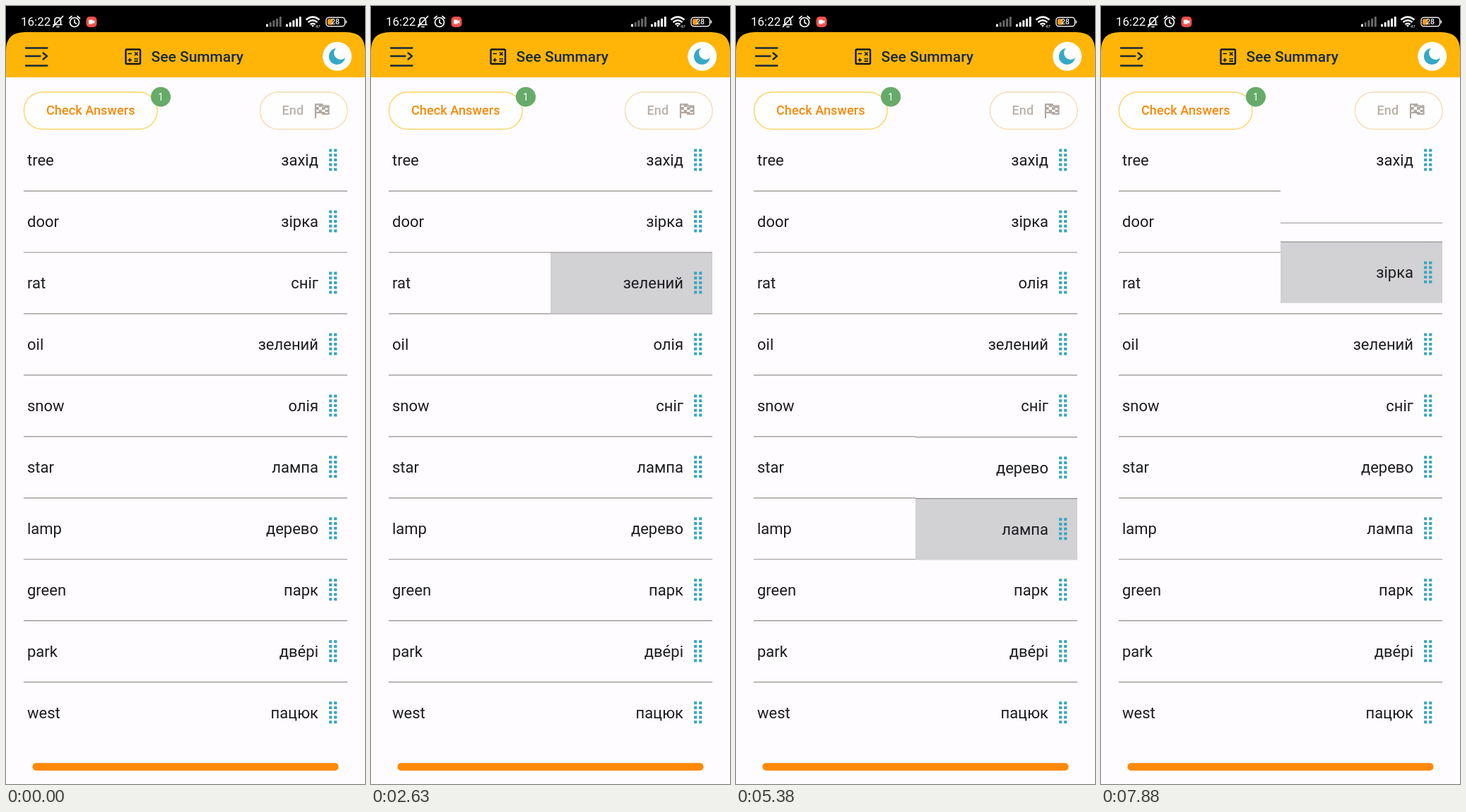
An HTML page for the animation above (8000 ms loop, 508 px wide and 1102 px high).

```html
<!DOCTYPE html>
<html lang="en">
<head>
<meta charset="utf-8">
<title>Match the words</title>
<style>
  html, body { margin: 0; width: 100%; height: 100%; overflow: hidden; background: #fefcfe; }
  svg { display: block; width: 508px; height: 1102px; font-family: Roboto, sans-serif; }
  .word { font-size: 22px; fill: #1c1b1f; }
  .right { text-anchor: end; }
  .button { font-size: 18px; font-weight: 500; letter-spacing: .1px; }
  .rule { stroke: #928f8c; stroke-width: 1.2; }
  .grip { stroke: #38a6bf; stroke-width: 4.2; stroke-dasharray: 4 2.75; }
  .cell rect { fill: none; }
  .cell.held rect { fill: #d2d1d4; }
  .line { fill: none; stroke: #fff; stroke-width: 1.7; stroke-linecap: round; stroke-linejoin: round; }
  .ink { fill: none; stroke: #17293c; stroke-width: 2.3; stroke-linecap: round; stroke-linejoin: round; }
</style>
</head>
<body>
<svg viewBox="0 0 508 1102">
  <rect width="508" height="101" fill="#000"/>
  <path d="M0 101V63Q0 37 27 37H481Q508 37 508 63V101Z" fill="#ffb508"/>

  <!-- status bar -->
  <text x="21" y="28" font-size="17" fill="#fff">16:22</text>
  <g class="line">
    <path d="M67 26.500H79M69 26V21Q69 16.500 73 16.500Q77.500 16.500 77.500 21V26M72 29.500H75M66.500 29.500L80.500 14.500"/>
    <circle cx="97" cy="23" r="6.500"/>
    <path d="M97 19.500V23.500L99.500 25M89.500 17.500L93 14.500M104.500 17.500L101 14.500"/>
  </g>
  <rect x="113.500" y="15" width="15" height="15" rx="5" fill="#ee504c"/>
  <path d="M117 19.500h5.500v2l2.800-1.600v5.200l-2.800-1.600v2H117z" fill="#fff"/>
  <g id="signal"></g>
  <g fill="none" stroke="#fff" stroke-width="2.400">
    <path d="M424.500 19.500Q434 11.500 443.500 19.500M427.500 23Q434 17.500 440.500 23M430.500 26Q434 23.500 437.500 26"/>
    <path d="M432 27L434 30L436 27Z" fill="#fff" stroke="none"/>
  </g>
  <text x="438" y="31" font-size="6" fill="#fff">47</text>
  <rect x="453" y="16.200" width="26.500" height="12.600" rx="4" fill="none" stroke="#e8e8e8" stroke-width="1.500"/>
  <path d="M481 20.500Q483 22.500 481 24.500Z" fill="#e8e8e8" stroke="#e8e8e8"/>
  <rect x="455" y="18.200" width="7.500" height="8.600" rx="2" fill="#f59b23"/>
  <text x="466" y="26.200" font-size="10.500" font-weight="500" fill="#fff" text-anchor="middle">28</text>

  <!-- header -->
  <path class="ink" d="M28 59.500H58.500M28 71H48.500M28 84.500H58.500M52.500 66.500L58 71L52.500 75.500"/>
  <rect x="169.500" y="61.500" width="20.500" height="20.500" rx="1.500" fill="none" stroke="#111820" stroke-width="2.400"/>
  <path d="M172.500 67.500H178M182 65.500L186.500 70M186.500 65.500L182 70M172.500 76.500H178M175.250 73.700V79.300M181.500 75H187M181.500 78.200H187" fill="none" stroke="#111820" stroke-width="1.700"/>
  <text x="205.500" y="79" font-size="21" font-weight="500" fill="#17293c">See Summary</text>
  <circle cx="468.700" cy="71.300" r="20.500" fill="#fff"/>
  <path d="M467 59.700A11.700 11.700 0 1 0 480 73.300A9.300 9.300 0 0 1 467 59.700Z" fill="#36a8c7"/>

  <!-- buttons -->
  <rect x="25.500" y="122" width="188.500" height="52.500" rx="26" fill="#fffefe" stroke="#fbd467" stroke-width="1.400"/>
  <text class="button" x="57" y="154" fill="#f58a0b">Check Answers</text>
  <circle cx="219" cy="128.700" r="14" fill="#66ab69"/>
  <text x="219" y="133.600" font-size="14" fill="#fff" text-anchor="middle">1</text>
  <rect x="359.500" y="122" width="123.500" height="52.500" rx="26" fill="#fffefe" stroke="#f6dcb4" stroke-width="1.400"/>
  <text class="button" x="390.500" y="154" fill="#b9b1aa">End</text>
  <path d="M438 159V139.300H447.500L448.500 141.500H456.500V153H448L447 150.800H438" fill="none" stroke="#b0a8a1" stroke-width="2.200"/>
  <path d="M439 143H442.700V147H439ZM442.700 139.300H447V143H442.700ZM447 143H451.500V147H447ZM451.500 141H456V144.500H451.500ZM442.700 147H447V151H442.700ZM451.500 147H456V150H451.500ZM447 150H451.500V153H447Z" fill="#b0a8a1"/>

  <g id="left"></g>
  <g id="cells"></g>
  <rect x="37.500" y="1072.300" width="433" height="10.700" rx="5" fill="#ff8906"/>
</svg>
<script>
  const LOOP = 8000, STEP = 125, PITCH = 86.95, TOP = 175.1;
  const left = document.getElementById('left');
  const cells = document.getElementById('cells');

  const english = 'tree door rat oil snow star lamp green park west'.split(' ');

  // keys: [ms, slot]; held: [from, to] in ms
  const words = [
    { text: 'захід' },
    { text: 'зірка', keys: [[7625, 1], [7875, 1.83]], held: [7500, 8000] },
    { text: 'сніг', keys: [[875, 2], [1125, 3.06], [1500, 3.06], [1750, 4]], held: [750, 2125] },
    { text: 'зелений', keys: [[1000, 3], [1125, 2.06], [1250, 2], [2625, 2], [3000, 3]], held: [2500, 3250] },
    { text: 'олія', keys: [[1625, 4], [1875, 3], [2750, 3], [3000, 2], [7750, 2], [7875, 1.52]] },
    { text: 'лампа', keys: [[4875, 5], [5125, 6.01]  , [5750, 6.01], [5875, 6]], held: [4750, 5875] },
    { text: 'дерево', keys: [[5000, 6], [5250, 5.03], [5375, 5.01], [5500, 5]] },
    { text: 'парк' },
    { text: 'две́рі' },
    { text: 'пацюк' }
  ];

  function add(parent, tag, attrs, text) {
    const node = document.createElementNS('http://www.w3.org/2000/svg', tag);
    for (const name in attrs) node.setAttribute(name, attrs[name]);
    if (text) node.textContent = text;
    return parent.appendChild(node);
  }

  function rule(parent, x1, x2, y) {
    add(parent, 'line', { class: 'rule', x1, x2, y1: y, y2: y });
  }

  function place(node, slot) {
    node.setAttribute('transform', `translate(0 ${TOP + slot * PITCH})`);
  }

  function slotAt(keys, t) {
    if (t <= keys[0][0]) return keys[0][1];
    for (let i = 1; i < keys.length; i++) {
      const [t0, a] = keys[i - 1], [t1, b] = keys[i];
      if (t < t1) return a + (b - a) * (t - t0) / (t1 - t0);
    }
    return keys[keys.length - 1][1];
  }

  const signal = document.getElementById('signal');
  [368, 396].forEach((x, dim) => {
    for (let i = 0; i < 5; i++) {
      const height = 4 + i * 2.6;
      add(signal, 'rect', {
        x: x + i * 4.7, y: 29.5 - height, width: 3, height, rx: 1,
        fill: dim || i < 1 ? '#fff' : '#686868'
      });
    }
  });

  english.forEach((text, i) => {
    const row = add(left, 'g');
    place(row, i);
    if (i) rule(row, 25, 254, 0);
    add(row, 'text', { class: 'word', x: 30, y: 51.2 }, text);
  });

  words.forEach((word, i) => {
    const cell = word.node = add(cells, 'g', { class: 'cell' });
    add(cell, 'rect', { x: 254, y: 0, width: 229, height: 86.5 });
    if (i) rule(cell, 254, 483, 0);
    add(cell, 'text', { class: 'word right', x: 442, y: 51.2 }, word.text);
    for (const x of [459.2, 466.2]) {
      add(cell, 'line', { class: 'grip', x1: x, x2: x, y1: 27.5, y2: 58.5 });
    }
    place(cell, i);
  });

  const movers = words.filter(word => word.keys);

  function draw(now) {
    const t = Math.floor(now % LOOP / STEP) * STEP;
    for (const { node, keys, held } of movers) {
      const active = !!held && t >= held[0] && t < held[1];
      place(node, slotAt(keys, t));
      node.classList.toggle('held', active);
      if (active && cells.lastChild !== node) cells.append(node);
    }
    requestAnimationFrame(() => draw(performance.now()));
  }
  draw(performance.now());
</script>
</body>
</html>
```
